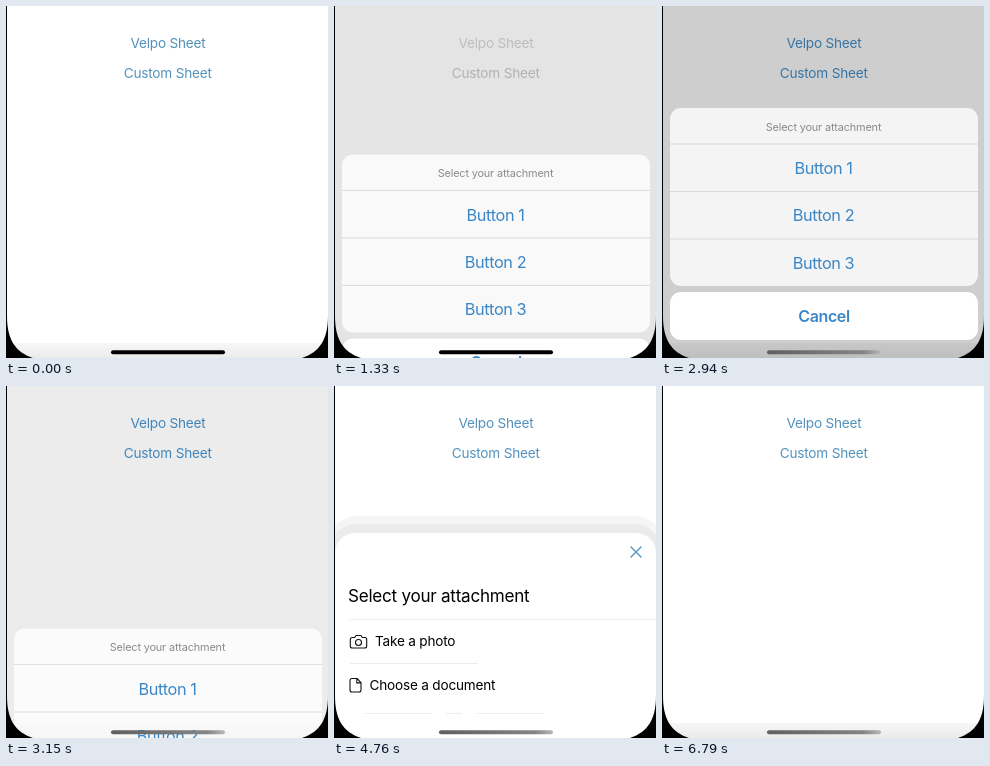
Recreate the animation shown at these times as an HTML page. Size 322 px wide and 352 px high, loop 7.98 s.

```html
<!DOCTYPE html>
<html lang="en">
<head>
<meta charset="utf-8">
<title>Sheets</title>
<style>
  html, body { margin: 0; width: 100%; height: 100%; overflow: hidden; background: #fff; }
  svg { display: block; width: 322px; height: 352px; }
  text { font-family: Inter, sans-serif; letter-spacing: -.015em; }
  .link { font-size: 13.6px; text-anchor: middle; }
  .hint { font-size: 10.9px; text-anchor: middle; fill: #8b8b8b; }
  .action { font-size: 16.3px; letter-spacing: -.025em; text-anchor: middle; fill: #3a86c6; }
  .cancel { font-size: 16px; font-weight: 600; }
  .title { font-size: 17.1px; }
  .item { font-size: 13.6px; }
  .icon { fill: none; stroke: #111; stroke-width: 1.1; stroke-linejoin: round; stroke-linecap: round; }
</style>
</head>
<body>
<svg viewBox="0 0 322 352">
  <defs>
    <linearGradient id="floor" x2="0" y2="1">
      <stop stop-color="#f7f7f7"/><stop offset="1" stop-color="#ebebeb"/>
    </linearGradient>
    <linearGradient id="grip">
      <stop stop-color="#606060"/><stop offset=".85" stop-color="#858585"/><stop offset="1" stop-color="#b8b8b8"/>
    </linearGradient>
  </defs>

  <rect width="322" height="352" fill="#fff"/>
  <rect y="337" width="322" height="15" fill="url(#floor)"/>
  <text id="first" class="link" x="162" y="42.2">Velpo Sheet</text>
  <text id="second" class="link" x="161.7" y="72.2">Custom Sheet</text>
  <rect id="dim" width="322" height="352"/>

  <g id="actions">
    <rect x="8" y="98" width="308" height="178" rx="11" fill="#fff" fill-opacity=".78"/>
    <path d="M8 134h308M8 181.5h308M8 229h308" stroke="#000" stroke-opacity=".12"/>
    <text class="hint" x="161.5" y="120.7">Select your attachment</text>
    <text class="action" x="161.5" y="164.2">Button 1</text>
    <text class="action" x="161.5" y="211.4">Button 2</text>
    <text class="action" x="161.5" y="258.8">Button 3</text>
    <rect x="8" y="282" width="308" height="48" rx="11" fill="#fff"/>
    <text class="action cancel" x="162" y="312">Cancel</text>
  </g>

  <g id="drawer">
    <rect x="-7" y="130" width="337" height="300" rx="30" fill="#f5f5f5"/>
    <rect x="-3" y="138" width="329" height="300" rx="25" fill="#ebebeb"/>
    <rect x="1" y="147" width="321" height="300" rx="20" fill="#fff"/>
    <path d="M297 161l10 10M307 161l-10 10" stroke="#5292bc" stroke-width="1.3" stroke-linecap="round"/>
    <text class="title" x="14" y="216">Select your attachment</text>
    <path d="M15 233.5h307M16 277.5h128M31 327.5h66M112 327.5h16M143 327.5h66" stroke="#ededed"/>
    <g id="photo">
      <path class="icon" d="M18.300 251.500h2.400l1.300-2h5l1.300 2h2.400q2 0 2 2v6.500q0 2-2 2h-12.400q-2 0-2-2v-6.500q0-2 2-2z"/>
      <circle class="icon" cx="24.500" cy="256.500" r="3"/>
      <text class="item" x="41" y="260.300">Take a photo</text>
    </g>
    <path class="icon" d="M18 292.500h5l4 4.200v7.300q0 2-2 2h-7q-2 0-2-2v-9.500q0-2 2-2zM22.800 292.700v4.200h4"/>
    <text class="item" x="35.500" y="304">Choose a document</text>
  </g>

  <rect id="home" x="105" y="344.300" width="114" height="4" rx="2"/>
  <path d="M0 0H1V310C1 333 9 346 27 352H0ZM322 310C322 333 314 346 296 352H322Z"/>
</svg>
<script>
const LOOP = 7980, TICK = 70;
const $ = id => document.getElementById(id);
const set = (id, attrs) => {
  for (const key in attrs) $(id).setAttribute(key, attrs[key]);
};
const progress = (t, from, to) => Math.min(1, Math.max(0, (t - from) / (to - from)));
const easeOut = (p, power) => 1 - (1 - p) ** power;
const smooth = p => p * p * (3 - 2 * p);
const within = (t, from, to) => t >= from && t < to;
const lerp = (a, b, p) => a + (b - a) * p;

function linkColor(t) {
  if (within(t, 1190, 2940)) return '#c6c6c6';
  return within(t, 2940, 3360) ? '#4590ca' : '#5292bc';
}

// Pressed labels drop at once, then fade back in.
function pressed(t, down, up, back) {
  return t < down ? 1 : lerp(.18, 1, progress(t, up, back));
}

function render(t) {
  const color = linkColor(t);
  set('first', { fill: color, opacity: pressed(t, 1050, 1170, 1400) });
  set('second', { fill: color, opacity: pressed(t, 4270, 4340, 4550) });

  const rise = progress(t, 1200, 1680);
  const fall = smooth(progress(t, 2890, 3370));
  const shown = t < 2890 ? easeOut(rise, 5) : 1 - fall;
  const shade = t < 2890 ? easeOut(rise, 2.4) : (1 - fall) ** 1.2;
  set('dim', { opacity: .2 * shade });
  set('actions', {
    transform: `translate(0 ${lerp(260, -4, shown)})`,
    visibility: shown > 0 ? 'visible' : 'hidden'
  });

  const open = easeOut(progress(t, 4350, 4760), 3) - smooth(progress(t, 6450, 6790));
  set('drawer', {
    transform: `translate(0 ${lerp(224, 0, open)})`,
    visibility: open > 0 ? 'visible' : 'hidden'
  });
  set('photo', { opacity: pressed(t, 6370, 6440, 6650) });

  set('home', { fill: t < 2940 ? '#000' : 'url(#grip)' });
}

const start = performance.now();
function frame() {
  const t = (performance.now() - start) % LOOP;
  render(Math.floor(t / TICK) * TICK);
  requestAnimationFrame(frame);
}
frame();
</script>
</body>
</html>
```
